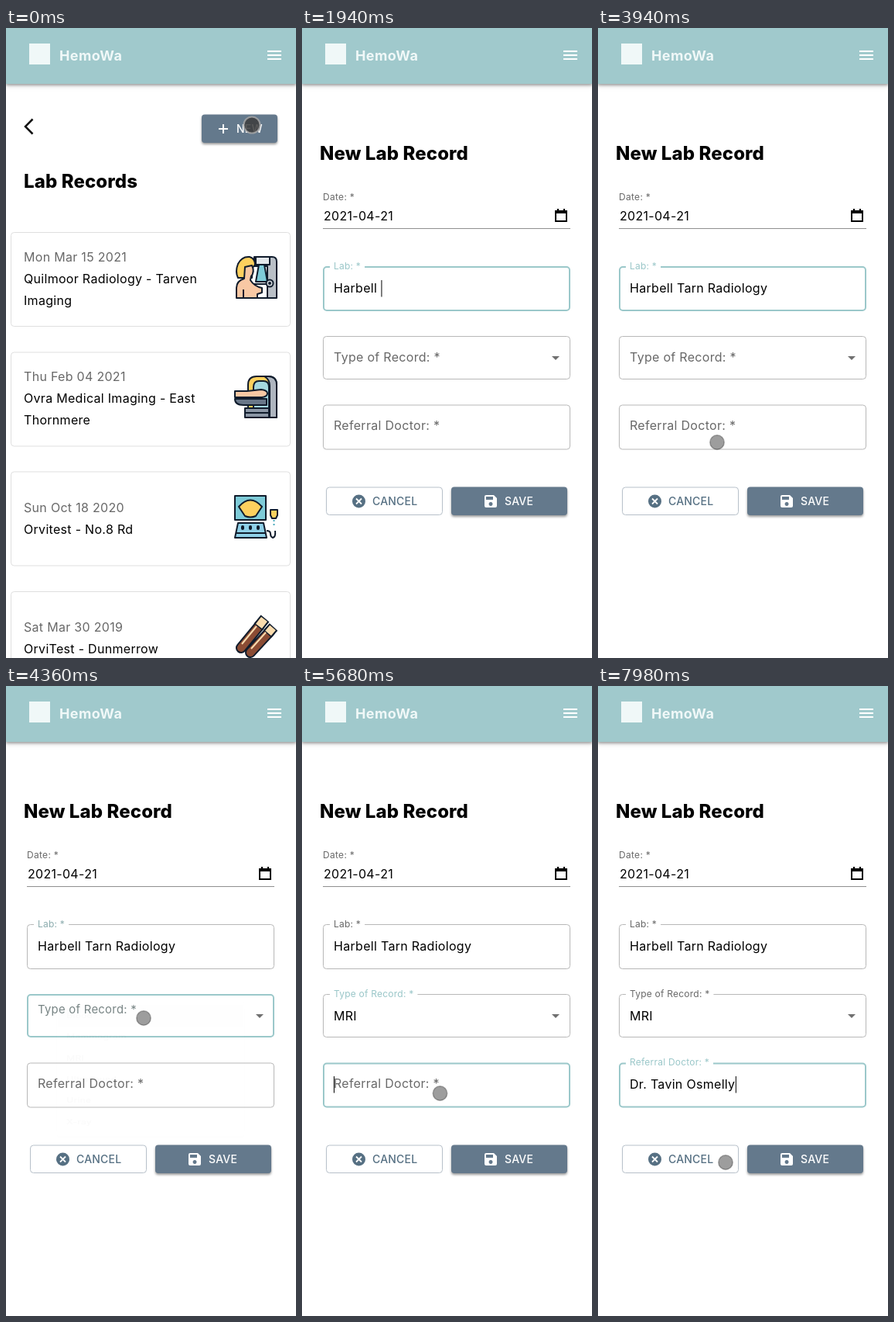
Write an HTML page that moves like this. It is 375 by 812 pixels and loops after 8000 ms.

```html
<!DOCTYPE html>
<html lang="en">
<head>
<meta charset="utf-8">
<title>Lab records</title>
<style>
  html, body { margin: 0; width: 375px; height: 812px; overflow: hidden; background: #fff; }
  svg { display: block; }
  text { font: 16px Inter, sans-serif; letter-spacing: .3px; white-space: pre; fill: #000; }
  .title { font-size: 24px; font-weight: 800; letter-spacing: .1px; }
  .muted { fill: #686868; }
  .small { font-size: 12px; }
  .button { font-size: 14px; font-weight: 500; letter-spacing: .2px; }
  .raised { fill: #64798c; filter: drop-shadow(0 2px 1.5px #0006); }
  .white { fill: #fff; }
  .card { fill: #fff; stroke: #dfdfdf; }
  .icon { stroke: #101c2c; stroke-width: 2; stroke-linejoin: round; fill: none; }
  .caret { stroke: #000; }
  .bar { fill: #a0c9cc; filter: drop-shadow(0 2px 1.5px #0004) drop-shadow(0 3px 2.5px #0002); }
  .paper { fill: #fff; filter: drop-shadow(0 4px 2.5px #0004) drop-shadow(0 4px 5px #0002) drop-shadow(0 2px 7px #0002); }
</style>
</head>
<body>
<svg width="375" height="812" viewBox="0 0 375 812">
  <g id="list">
    <path d="M34.500 117.500l-9.500 9.500 9.500 9.500" fill="none" stroke="#111" stroke-width="2.500"/>
    <rect class="raised" x="253" y="111.500" width="98" height="36.500" rx="4"/>
    <path d="M275 130h12M281 124v12" stroke="#fff" stroke-width="2"/>
    <text class="button white" x="298" y="135">NEW</text>
    <text class="title" x="23" y="206">Lab Records</text>
    <g id="cards"></g>

    <g class="icon" transform="translate(295 293)">
      <path fill="#b9bfc6" d="M26 2h23q6 0 6 6v47H43V14H26z"/>
      <path fill="#e3e7ea" d="M28 2h18v10H28z"/>
      <path fill="#7ecbd8" d="M32 12h7l4 22H28z"/>
      <path fill="#fdd05e" d="M5 29q-4-8 0-18Q10 1 20 2q7 2 7 10l-3 4-1 13z"/>
      <path fill="#f8c8a4" d="M14 15l9-2q4 8-1 14l-1 5q5 8 15 10v6l-6 2v5H3V42q0-9 10-12z"/>
      <path d="M26 37h16M12 55V44M4 55h50"/>
      <circle cx="46" cy="36" r="4.500" fill="#d5d9de"/><circle cx="46" cy="36" r="1"/>
    </g>

    <g class="icon" transform="translate(295 448)">
      <path fill="#fdd05e" d="M18 54V12Q18 1 29 1h15q11 0 11 11v42z"/>
      <path fill="#aeb5bf" d="M46 54V13q0-8-7-12h5q11 0 11 11v42z"/>
      <path fill="#a5d8e0" d="M25 54V15q0-8 7-8h6q7 0 7 8v39z"/>
      <path fill="#f8c8a4" d="M1 20h16l18-2q8 1 8 5t-7 5H1z"/>
      <path fill="#697789" d="M1 30h41v8H12Q1 38 1 30z"/>
      <path fill="#8b96a5" d="M14 42h31v12H14zM14 48h31"/>
    </g>

    <g class="icon" transform="translate(295 602)">
      <path fill="#7ecbd8" d="M1 1h40v31H1z"/>
      <path fill="#fdd05e" d="M6 15q15-17 30 0l-8 12q-7 3-14 0z"/>
      <path fill="#8fd0e8" d="M5 36h33l4 19H1zM3 49h37"/>
      <path d="M11 41v2M21 41v2M31 41v2" stroke-width="4" stroke-linecap="round"/>
      <path fill="#fdd05e" d="M47 19h9v7l-2 4h-5l-2-4z"/>
      <path d="M51.500 32v10" stroke="#4ba9bb" stroke-dasharray="2 3"/>
      <path d="M42 46q5 0 5 4t3 5q4-1 3-9"/>
    </g>

    <g class="icon" transform="translate(295 756)">
      <g stroke-linecap="round">
        <path d="M9 43L33 14M21 49L46 22" stroke-width="14"/>
        <path d="M9 43L33 14M21 49L46 22" stroke-width="10" stroke="#8b4c34"/>
      </g>
      <path d="M31 16l9-11M43 25l8-9" stroke-width="14"/>
      <path d="M32 15l7-9M44 24l6-7" stroke-width="10" stroke="#fbdcae"/>
      <path d="M10 38l19-23M22 44l19-21" stroke="#fbdcae"/>
    </g>
  </g>

  <g id="form">
    <text class="title" x="23" y="170">New Lab Record</text>
    <text class="small muted" x="27" y="222">Date: *</text>
    <text x="28" y="248">2021-04-21</text>
    <path d="M27 258.500h320" stroke="#8f8f8f"/>
    <path d="M328 236h14v13h-14zM328 238h14M331 233v3M339 233v3" fill="none" stroke="#000" stroke-width="2"/>
    <g id="fields"></g>
    <path d="M323 423h10l-5 5z" fill="#707070"/>
    <rect x="31.500" y="592" width="150" height="35.500" rx="4" fill="#fff" stroke="#b7c0c9"/>
    <circle cx="73.500" cy="610" r="8.500" fill="#567083"/>
    <path d="M70 606.500l7 7m0-7l-7 7" stroke="#fff" stroke-width="1.800"/>
    <text class="button" x="91" y="615" style="fill:#567083">CANCEL</text>
    <rect class="raised" x="193" y="591.500" width="150" height="36.500" rx="4"/>
    <path class="white" fill-rule="evenodd" d="M238 602h10l4 4v10q0 2-2 2h-12q-2 0-2-2v-12q0-2 2-2zm0 2v4h9v-4zm6 7a2.500 2.500 0 1 0 .1 0z"/>
    <text class="button white" x="262" y="615">SAVE</text>
  </g>

  <g id="menu">
    <rect class="paper" x="27" y="393" width="320" height="305" rx="4"/>
    <rect x="27" y="401" width="320" height="48" fill="#e5eeef"/>
    <g id="options"></g>
  </g>

  <rect class="bar" width="375" height="72"/>
  <rect x="30" y="20" width="27" height="27" fill="#f0f8f8"/>
  <text x="69" y="41.500" style="font-size:18px;font-weight:700;letter-spacing:.4px;fill:#f0f8f8">HemoWa</text>
  <path d="M338 30h18m-18 5h18m-18 5h18" stroke="#fff" stroke-width="2"/>

  <g id="pointer">
    <circle id="touch"/>
    <path id="arrow" d="M0 0v14.500l3.300-3.100 2.300 5.300 2.300-1-2.300-5.200h4.600z" stroke="#fff" stroke-width=".8"/>
  </g>
</svg>

<script>
const LOOP = 8000, FORM_AT = 290, MENU_OPEN = 4340, MENU_CLOSE = 5080;
const $ = id => document.getElementById(id);
const clamp = v => Math.min(1, Math.max(0, v));
const easeOut = v => 1 - (1 - clamp(v)) ** 3;
const smooth = v => (v = clamp(v)) * v * (3 - 2 * v);
const within = (t, a, b) => t >= a && t < b;
const show = (el, on) => el.style.display = on ? '' : 'none';
const set = (el, attrs) => Object.entries(attrs).forEach(([k, v]) => el.setAttribute(k, v));

// Key times from bursts of [start, interval, count]
const keys = bursts => bursts.flatMap(([start, gap, n]) =>
  Array.from({ length: n }, (_, i) => start + gap * i));

const cards = [
  [263.5, 301, 'Mon Mar 15 2021', 'Quilmoor Radiology - Tarven', 'Imaging'],
  [418, 455, 'Thu Feb 04 2021', 'Ovra Medical Imaging - East', 'Thornmere'],
  [572, 624, 'Sun Oct 18 2020', 'Orvitest - No.8 Rd'],
  [726.5, 778, 'Sat Mar 30 2019', 'OrviTest - Dunmerrow']
];
$('cards').innerHTML = cards.map(([top, y, date, ...lines]) =>
  `<rect class="card" x="6.5" y="${top}" width="361" height="121" rx="4"/>
   <text class="muted" x="23" y="${y}">${date}</text>` +
  lines.map((line, i) => `<text x="23" y="${y + 28 * (i + 1)}">${line}</text>`).join('')).join('');

$('options').innerHTML = ['Blood', 'Mammogram', 'MRI', 'Ultrasound', 'Urine', 'X-ray']
  .map((name, i) => `<text x="43" y="${430 + 48 * i}">${name}</text>`).join('');

const fields = [
  { label: 'Lab: *', top: 307, height: 58, base: 340, focus: 890, blur: MENU_OPEN,
    value: 'Harbell Tarn Radiology',
    keys: keys([[1200, 105, 8], [2240, 140, 4], [2920, 85, 5], [3400, 50, 5]]) },
  { label: 'Type of Record: *', top: 397, height: 56, base: 430, focus: MENU_OPEN, blur: 5680,
    value: 'MRI' },
  { label: 'Referral Doctor: *', top: 485.5, height: 58, base: 518, focus: 5680, blur: LOOP + 1,
    value: 'Dr. Tavin Osmelly',
    keys: keys([[6080, 120, 2], [6460, 140, 2], [6760, 88.8, 10], [7620, 100, 3]]) }
];
$('fields').innerHTML = fields.map(f =>
  `<g><rect rx="4" fill="none"/><path stroke="#fff" stroke-width="3"/>
   <text>${f.label}</text><text x="41" y="${f.base + 1}"></text><path class="caret"/></g>`).join('');
fields.forEach((f, i) => [f.box, f.gap, f.name, f.text, f.caret] = $('fields').children[i].children);

function drawField(f, t) {
  const focused = within(t, f.focus, f.blur);
  const lift = easeOut((t - f.focus) / 200);
  const tint = focused ? lift : t < f.focus ? 0 : 1 - easeOut((t - f.blur) / 200);
  const line = focused ? 2 : 1;
  // The border lies inside the box at either weight
  set(f.box, {
    x: 27 + line / 2, y: f.top + line / 2, width: 320 - line, height: f.height - line,
    stroke: focused ? '#9bc8ca' : '#b8b8b8', 'stroke-width': line
  });
  f.name.style.fill = `rgb(${104 + 50 * tint},${104 + 95 * tint},${104 + 97 * tint})`;
  set(f.name, { transform: `translate(41 ${f.base - 29 * lift}) scale(${1 - lift / 4})` });
  const gap = (f.name.getComputedTextLength() * .75 + 10) * easeOut((t - f.focus - 50) / 100);
  set(f.gap, { d: `M36 ${f.top + 1}h${gap}` });

  const pressed = f.keys ? f.keys.filter(k => k <= t) : [];
  const count = f.keys ? pressed.length : t >= MENU_CLOSE ? f.value.length : 0;
  f.text.textContent = f.value.slice(0, count);
  const idle = t - (pressed.at(-1) ?? f.focus);
  show(f.caret, f.keys && focused && idle < 320);
  const x = 41.5 + (count ? f.text.getComputedTextLength() + .5 : 0);
  set(f.caret, { d: `M${x} ${f.base - 15}v21.500` });
}

const path = [
  [0, 318, 125], [290, 318, 125], [640, 205, 315], [760, 190, 332], [3800, 190, 332],
  [3940, 154, 534], [4120, 172, 440], [4200, 178, 428], [4640, 178, 428],
  [4860, 179.5, 493], [4980, 178.5, 525], [7860, 178.5, 525], [7980, 165, 614], [LOOP, 165, 614]
];
const presses = [[-40, 50], [770, 880], [4230, 4330], [5460, 5660]];

function drawPointer(t) {
  const i = path.findIndex(p => p[0] > t);
  const [t0, x0, y0] = path[i - 1], [t1, x1, y1] = path[i];
  const p = smooth((t - t0) / (t1 - t0));
  set($('pointer'), { transform: `translate(${x0 + (x1 - x0) * p} ${y0 + (y1 - y0) * p})` });
  show($('pointer'), t < 1200 || within(t, 3820, 6080) || t >= 7860);
  const overMenu = within(t, 4420, 5300);
  show($('arrow'), overMenu);
  show($('touch'), !overMenu);
  const down = Math.max(...presses.map(([a, b]) =>
    clamp((t - a + 20) / 40) * (1 - clamp((t - b + 20) / 40))));
  set($('touch'), {
    r: 9.2 + 1.3 * down,
    fill: `rgba(60,60,60,${.5 + .35 * down})`,
    stroke: down > .5 ? 'rgba(170,170,170,.8)' : 'rgba(60,60,60,.4)',
    'stroke-width': 1.5 + .5 * down
  });
}

function drawMenu(t) {
  const p = t < MENU_CLOSE ? smooth((t - MENU_OPEN) / 270) : 1 - smooth((t - MENU_CLOSE) / 240);
  show($('menu'), p > 0);
  $('menu').style.opacity = p;
  set($('menu'), {
    transform: `translate(187 425) scale(${.75 + .25 * p} ${.5625 + .4375 * p}) translate(-187 -425)`
  });
}

const start = performance.now();
function frame() {
  const t = (performance.now() - start) % LOOP;
  show($('list'), t < FORM_AT);
  show($('form'), t >= FORM_AT);
  fields.forEach(f => drawField(f, t));
  drawMenu(t);
  drawPointer(t);
  requestAnimationFrame(frame);
}
frame();
</script>
</body>
</html>
```
